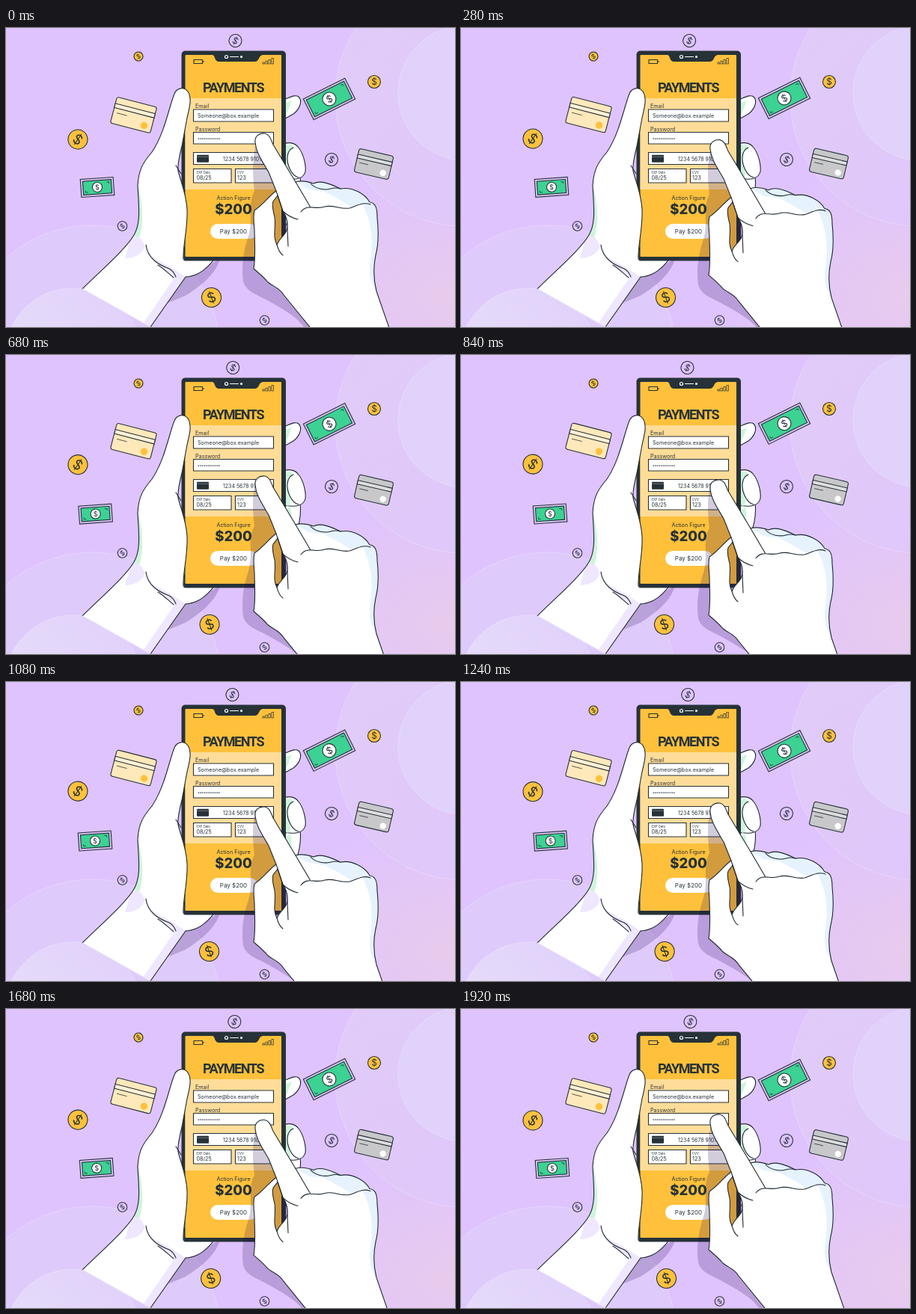
An HTML page for the animation above (1.96 s loop, 600x400 px).

```html
<!DOCTYPE html>
<html lang="en">
<head>
<meta charset="utf-8">
<title>Payments</title>
<style>
  html, body { margin: 0; width: 100%; height: 100%; overflow: hidden; background: #dfc3ff; }
  svg { display: block; width: 600px; height: 400px; }
  text { font-family: Inter, "Open Sans", sans-serif; fill: #263238; }
  .mid { text-anchor: middle; }
  .title { font: 700 18px Roboto, sans-serif; letter-spacing: -1.4px; }
  .ink { fill: none; stroke: #1d2930; stroke-width: 1.1; stroke-linecap: round; stroke-linejoin: round; }
  .white { fill: #fff; }
  .line { stroke: #263238; stroke-width: 1.1; }
  .thin { stroke-width: .7; }
  .arc { stroke: #fff; stroke-opacity: .65; stroke-width: .8; stroke-dasharray: 1 1; }
  .shade { fill: #22004a; opacity: .2; }
  .tint { fill: #e6f3ff; mix-blend-mode: multiply; }
</style>
</head>
<body>
<svg viewBox="0 0 600 400">
  <defs>
    <radialGradient id="pink" cx="1" cy=".9" r=".45">
      <stop offset="0" stop-color="#e8cbec"/><stop offset="1" stop-color="#dfc3ff"/>
    </radialGradient>
    <linearGradient id="haze" x1="0" y1="0" x2="1" y2="1">
      <stop offset="0" stop-color="#e1ccf8"/><stop offset="1" stop-color="#dfc6fb"/>
    </linearGradient>
    <linearGradient id="glow" x1="0" y1="1" x2="1" y2="0">
      <stop offset="0" stop-color="#e9e2f7"/><stop offset="1" stop-color="#e0cffc"/>
    </linearGradient>
  </defs>

  <rect width="600" height="400" fill="url(#pink)"/>
  <g class="arc">
    <circle cx="612" cy="93" r="172" fill="url(#haze)"/>
    <circle cx="614" cy="87" r="90" fill="#e0d2fb"/>
    <circle cx="115" cy="436" r="172" fill="#dfcafc"/>
    <circle cx="90" cy="440" r="92" fill="url(#glow)"/>
  </g>

  <g id="items"></g>

  <!-- fingers behind the phone -->
  <g class="ink">
    <path class="white" d="M368 97C378 94 386 88 391 92C397 98 392 109 384 115L368 124Z"/>
    <path class="white" d="M368 203L393 198C395 215 391 233 384 245C380 255 376 262 368 272Z"/>
    <path d="M368 210L380 204C384 220 379 240 374 250L368 260Z" fill="#cff3dc" stroke="none"/>
    <path class="white" d="M368 156C377 152 386 153 391 160C398 169 401 184 400 192C398 201 388 205 368 200Z"/>
    <path d="M369 160C377 153 384 156 384 161C376 163 374 175 378 185C381 193 380 200 377 202L368 199Z" fill="#cff3dc" stroke="none"/>
    <path d="M384 160C375 163 374 177 379 188C383 197 387 199 391 200"/>
    <path d="M372 101L382 97L374 117Z" fill="#cff3dc" stroke="none"/>
  </g>

  <path class="shade" d="M240 333L286 309C279 332 258 346 240 358L206 372Z"/>
  <path class="ink white" d="M234 300H284C272 321 256 333 239 333"/>

  <!-- phone -->
  <rect x="234.500" y="30.500" width="139.500" height="281" rx="5" fill="#263238"/>
  <rect x="239.500" y="36" width="128.500" height="270" rx="1" fill="#ffc13b"/>
  <path d="M276 36C280 37 278 45 285 45H332C339 45 337 37 343 36Z" fill="#263238"/>
  <g fill="none" stroke="#fff" stroke-width="1.200" stroke-linecap="round">
    <circle cx="294.500" cy="38.500" r="2"/><path d="M299.500 38.500H310.500"/><circle cx="314.500" cy="38.500" r="1"/>
  </g>
  <path class="line" d="M251 42.500H262.500V47.500H251ZM264 44V46" fill="none"/>
  <g id="bars" fill="#ffc13b"></g>
  <text class="title mid" x="303.500" y="86">PAYMENTS</text>

  <rect x="239.500" y="94" width="128.500" height="122" fill="#ffdd98"/>
  <g class="line white">
    <path d="M250.500 109H357.500V125H250.500ZM250.500 139.500H357.500V155H250.500ZM250.500 166.500H357.500V182.500H250.500ZM250.500 188.500H301V207H250.500ZM306.500 188.500H357.500V207H306.500Z"/>
  </g>
  <rect x="255" y="169.800" width="16" height="10" rx="1" fill="#263238"/>
  <path d="M255 172.300H271" stroke="#6e777c" stroke-width="1"/>
  <g font-size="7.200">
    <text x="253" y="107.300">Email</text>
    <text x="256" y="119.500">Someone@box.example</text>
    <text x="253" y="137.500">Password</text>
    <text x="256" y="151.500" font-size="5.500">***********</text>
    <text x="290" y="177.900" font-size="7">1234 5678 9101</text>
    <text x="254.500" y="195" font-size="4.200">EXP Date</text>
    <text x="309" y="195" font-size="4.200">CVV</text>
    <text x="254.500" y="203">08/25</text>
    <text x="309" y="203">123</text>
    <text class="mid" x="304" y="229.500">Action Figure</text>
    <text class="mid" x="304" y="248.800" font-size="18.500" font-weight="800">$200</text>
  </g>
  <rect x="273" y="262" width="63" height="20" rx="10" class="white"/>
  <text class="mid" x="304" y="274.700" font-size="8">Pay $200</text>

  <!-- holding hand -->
  <path class="white" d="M102 349C125 326 160 296 171 277C181 260 177 235 176 211C177 190 183 180 195 166C212 141 218 105 225 88C228 80 238 78 243 85C249 94 245 107 242 120L235 158C231 174 229 183 230 191C234 207 241 222 242 243C243 268 235 298 238 320L240 333L193 400Z"/>
  <path d="M176 211C177 235 181 260 171 277L177 283C184 268 184 235 176 211Z" fill="#cff3dc"/>
  <path d="M166 284C174 275 180 279 184 288L191 304L210 321L226 333L184 394L193 400L240 333L220 320L195 306L186 291C183 302 172 308 159 308Z" fill="#efe7ff"/>
  <g class="ink">
    <path d="M193 400L240 333M237 309C236 293 243 268 242 243C241 222 234 207 230 191C229 183 231 174 235 158L242 120C245 107 249 94 243 85C238 78 228 80 225 88C218 105 212 141 195 166C183 180 177 190 176 211C177 235 181 260 171 277C160 296 125 326 102 349"/>
    <path d="M102 349L193 400" stroke="#e9dcfa"/>
    <path d="M187 290C189 309 205 317 218 322C222 324 225 328 227 333M203 317C211 322 218 329 224 334M227 184L234 195"/>
  </g>

  <!-- pointing hand -->
  <path id="shadow" class="shade" d="M334 155C329 175 329 195 332 218C322 237 331 255 324 278C315 305 315 325 317 339C321 354 338 357 354 367C370 376 384 384 393 394L425 430L440 300L370 240L350 190Z"/>
  <g id="hand">
    <path class="ink white" fill-rule="evenodd" d="M333 153C332 145 338 140 346 141C352 142 354 149 357 156L387 206C396 203 405 206 411 208C422 202 440 212 447 215C463 212 480 222 486 233C494 234 496 241 496 253C498 272 498 289 494 304C490 323 492 340 495 352L522 430H430L406 400L371 357C365 347 357 346 350 340C344 333 337 327 331 322C334 304 332 284 332 270C331 258 330 251 332 244C344 236 353 223 361 218L351 193C341 176 334 166 333 153Z
      M363 224L370 245C375 252 377 258 376 268C373 279 366 279 362 290C356 279 361 267 359 253C357 245 355 239 357 232C359 229 361 227 363 224Z"/>
    <g class="tint">
      <path d="M389 207C398 205 404 207 411 208C422 202 440 212 447 215C463 212 480 222 486 233C478 234 470 235 461 239L446 230L426 219L404 216Z"/>
      <path d="M476 235L490 234C496 238 496 251 497 273C497 293 492 310 492 330L495 352C487 342 484 325 487 310C491 283 488 256 476 235Z"/>
    </g>
    <g class="ink">
      <path d="M361 218L370 245C376 251 382 254 390 256M387 206L407 240M394 246C403 234 414 244 426 239C438 236 446 243 459 241C469 238 477 232 487 236"/>
      <path d="M362 290C364 297 367 302 370 304M376 268L377 292M407 208C414 216 427 217 434 215C441 213 443 214 447 215"/>
    </g>
  </g>
</svg>
<script>
const $ = id => document.getElementById(id);
const gold = '#ffc13b';
const movers = [];

// Places a drawing at x, y; dx, dy is its drift at the far end of the swing.
function add(x, y, turn, body, dx = 0, dy = 0) {
  const g = document.createElementNS('http://www.w3.org/2000/svg', 'g');
  g.innerHTML = `<g transform="rotate(${turn})">${body}</g>`;
  $('items').append(g);
  movers.push({ g, x, y, dx, dy });
}

const coin = (r, fill) =>
  `<circle class="line" r="${r}" fill="${fill}"/>
   <text class="mid" y="${r * .5}" font-size="${r * 1.4}">$</text>`;

const box = (w, h, fill, r = 0) =>
  `<rect class="line" x="${-w / 2}" y="${-h / 2}" width="${w}" height="${h}" rx="${r}" fill="${fill}"/>`;

const bill = (w, h, r) =>
  box(w, h, '#d9c2f5') + box(w - 6, h - 6, '#3cd293') +
  `<path class="ink thin" d="M${-w / 2 + 6} ${h / 2 - 8}v2h3M${w / 2 - 6} ${8 - h / 2}v-2h-3"/>` +
  coin(r, '#fff');

const card = (w, h, fill, band, mark) =>
  box(w, h, fill, 3) +
  `<path d="M${-w / 2} ${-h * .25}h${w}v${h * .16}h${-w}z" fill="${band}" class="line"/>
   <path class="ink thin" d="M${-w * .4} ${h * .08}h${w * .24}"/>
   <circle cx="${w * .31}" cy="${h * .28}" r="${h * .13}" fill="${mark}"/>`;

add(177, 38, -25, coin(6, gold));
add(96, 149, 35, coin(13, gold), 0, -3.3);
add(492, 72, 0, coin(8.5, gold));
add(274.5, 360.5, -20, coin(13, gold), -3.4);
add(306.5, 17, 25, coin(8.5, 'none'), -4.6);
add(435, 176, 25, coin(8.5, 'none'));
add(155.5, 265, -35, coin(6.3, 'none'));
add(345.5, 391, -35, coin(6.3, 'none'));
add(122, 213, -4, bill(44, 24, 6.5), -3.4, -.6);
add(432, 95, -26.5, bill(62, 31, 9), 0, -3.8);
add(170.5, 116.5, 14.5, card(55, 36, '#ffe9bb', '#fff0d4', gold), 0, -1.8);
add(491.5, 182, 13, card(47, 32, '#c8c8ca', '#dededf', '#fff'), 0, -1.8);

for (let i = 0; i < 4; i++) {
  const h = 2 + i * 1.8;
  $('bars').innerHTML += `<rect class="line thin" x="${343 + i * 4}" y="${48 - h}" width="2.4" height="${h}"/>`;
}

const move = (el, x, y) => el.setAttribute('transform', `translate(${x} ${y})`);

function draw(now) {
  const step = Math.floor(now % 1960 / 40);
  const p = 1 - Math.abs(24 - step) / 24;
  for (const m of movers) move(m.g, m.x + m.dx * p, m.y + m.dy * p);
  move($('hand'), 0, 29.7 * p);
  move($('shadow'), 0, 15 * p);
}

const start = performance.now();
function tick() {
  draw(performance.now() - start);
  requestAnimationFrame(tick);
}
tick();
</script>
</body>
</html>
```
